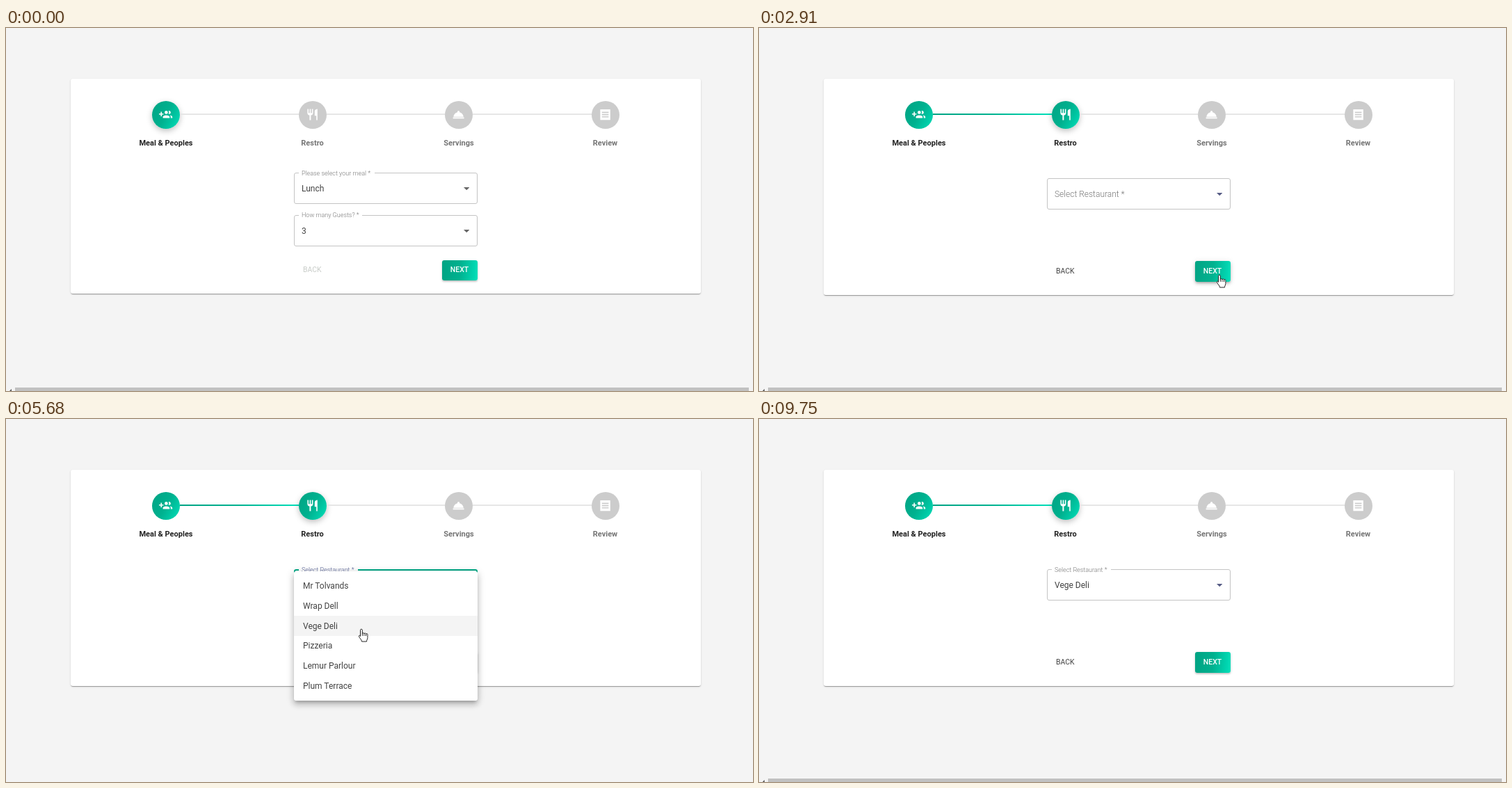
Recreate the animation shown at these times as an HTML page. Size 1074x522 px, loop 9820 ms.

```html
<!DOCTYPE html>
<html lang="en">
<head>
<meta charset="utf-8">
<title>Meal booking stepper</title>
<style>
  html, body { margin: 0; width: 100%; height: 100%; overflow: hidden; background: #f4f4f4; }
  body { position: relative; font: 12px Roboto, sans-serif; color: #424242; }
  div, span, svg, fieldset { position: absolute; box-sizing: border-box; }
  .text { line-height: 20px; margin-top: -10px; white-space: nowrap; }
  #card { left: 92.5px; top: 72.5px; width: 906.5px; background: #fff; border-radius: 3px;
    box-shadow: 0 2px 1px -1px #0003, 0 1px 1px #00000024, 0 1px 3px #0000001f; }
  .line { top: 122.6px; width: 170.5px; height: 2.4px; background: #e6e6e6; }
  .dot { top: 105px; width: 40px; height: 40px; border-radius: 50%; background: #ccc; }
  .dot svg { left: 10.4px; top: 10.4px; width: 19.2px; height: 19.2px; fill: #fff; fill-rule: evenodd; }
  .dot.done { background: linear-gradient(120deg, #00a383, #00b18f 50%, #00e0ba); }
  .line.done { background: linear-gradient(95deg, #00a383, #00b18f 50%, #00e0ba); }
  .dot.now { box-shadow: 0 3px 8px #00000040; }
  .step { top: 166px; width: 140px; text-align: center; font-size: 11px; font-weight: 600; color: #757575; }
  .step.done { color: #212121; }
  .field { left: 414px; width: 263.6px; height: 44.6px; }
  .field fieldset { left: 0; right: 0; top: -5px; bottom: 0; margin: 0; padding: 0 6px; min-width: 0;
    border: 1px solid #c4c4c4; border-radius: 3px; }
  .field legend { height: 10px; padding: 0 4px; font-size: 9px; line-height: 10px; overflow: hidden;
    white-space: nowrap; color: transparent; }
  .fill { inset: 1px; border-radius: 3px; }
  .label { left: 11px; top: 0; font-weight: 300; color: #777; transform: scale(.75); transform-origin: 0 50%; }
  .value { left: 11px; top: 22.6px; }
  .drop { left: 244px; top: 20.2px; width: 8.4px; height: 4.2px; fill: #666; }
  #back { left: 427px; font-size: 10.4px; }
  #next { left: 626.5px; width: 51px; height: 29.6px; border-radius: 3px; overflow: hidden;
    background: linear-gradient(95deg, #00a383, #00b18f 50%, #00e0ba); }
  #next .text { left: 0; right: 0; top: 14.8px; text-align: center; font-size: 10.5px; font-weight: 500; color: #fff; }
  .ripple { border-radius: 50%; }
  #menu { left: 414px; top: 218.6px; width: 263.6px; height: 185.6px; background: #fff; border-radius: 3px;
    transform-origin: 0 20.6px;
    box-shadow: 0 4px 4px -2px #0003, 0 6px 8px 1px #00000024, 0 2px 11px 2px #0000001f; }
  .row { left: 0; right: 0; height: 28.8px; overflow: hidden; }
  .row .text { left: 13px; top: 14.4px; }
  #scroll { left: 0; right: 0; top: 517px; height: 5px; }
  #scroll div { left: 13px; width: 1055px; height: 5px; background: #c1c1c1; }
  #scroll svg { left: 5px; top: 2px; width: 3px; height: 3px; fill: #555; }
  #spot { width: 20px; height: 20px; margin: -10px; border-radius: 50%; background: #ff08; }
  #cursor { width: 1px; height: 1px; overflow: visible; fill: #fff; stroke: #222; stroke-width: 1; stroke-linejoin: round; }
</style>
</head>
<body>
<div id="card"></div>
<div id="steps"></div>
<div id="fields"></div>
<div class="text" id="back">BACK</div>
<div id="next"><div class="ripple"></div><div class="text">NEXT</div></div>
<div id="scroll"><div></div><svg viewBox="0 0 3 3"><path d="M0 3L3 0V3z"/></svg></div>
<div id="menu"></div>
<div id="spot"></div>
<svg id="cursor">
  <path id="arrow" d="M0 0V14l3.2-3 2.2 5 2.2-1-2.1-4.8h4.5z"/>
  <g id="hand">
    <path d="M-1.5 1.6a1.4 1.4 0 0 1 2.8 0v5.2a1.3 1.3 0 0 1 2.6.3a1.3 1.3 0 0 1 2.6.5a1.2 1.2 0 0 1 2.4.7v4.2c0 2.2-1.4 3-1.4 5.5h-7c0-2-2.6-4.5-4-7.1c-.7-1.4.9-2.2 1.5-1.2l.5.8z"/>
    <path d="M1.3 6.8v3M3.9 7.3v2.6M6.5 7.8v2.2" fill="none"/>
  </g>
</svg>
<script>
const LOOP = 9820;
const $ = s => document.querySelector(s);

// Bursts of motion: start, end, number of pictures. The picture rests in between.
const BURSTS = [[600, 950, 6], [1210, 1910, 11], [2120, 3050, 15], [3130, 3400, 5], [3540, 3890, 6],
  [4090, 5060, 14], [5130, 5680, 8], [5950, 6500, 9], [7750, 8380, 10], [8650, 8800, 3], [9680, 9750, 2]];

// Pointer stops: time, x, y
const POINTER = [[600, 1063, 506], [950, 828, 426], [1140, 828, 426], [1910, 662, 355], [3060, 662, 355],
  [3400, 571, 239], [4020, 571, 239], [4450, 540, 368], [4690, 523, 301], [5060, 511, 304],
  [5400, 511, 321], [5680, 511, 302], [7680, 511, 302], [8380, 868, 427], [8570, 868, 427],
  [8800, 1058, 497], [9610, 1058, 497], [9680, 1065, 512]];

const AT = { press: 2120, page: 2400, open: 3600, pick: 5925, close: 6180, blur: 9680, leave: 9750 };
const PRESSES = [2120, 3540, 5950];
const MEALS = ['Mr Tolvands', 'Wrap Dell', 'Vege Deli', 'Pizzeria', 'Lemur Parlour', 'Plum Terrace'];
const PICKED = 2, ROW = 28.8, ROW_TOP = 225.2;
const STEPS = [
  ['Meal & Peoples', 'M8 10H5V7H3v3H0v2h3v3h2v-3h3zM18 11a3 3 0 1 0-.9-5.86a5 5 0 0 1 0 5.72zM13 11a3 3 0 1 0 0-6a3 3 0 0 0 0 6zM19.6 13.2c.9.7 1.4 1.6 1.4 2.8v2h3v-2c0-1.5-2.4-2.5-4.4-2.8zM13 13c-2 0-6 1-6 3v2h12v-2c0-2-4-3-6-3z'],
  ['Restro', 'M16 6v8h3v8h2V2c-2.8 0-5 2.2-5 4zM11 9H9V2H7v7H5V2H3v7a4 4 0 0 0 3.75 4V22h2.5v-9A4 4 0 0 0 13 9V2h-2z'],
  ['Servings', 'M2 17h20v2H2zM13.8 7.8a2 2 0 1 0-3.6 0C6.3 8.6 3.3 11.9 3 16h18c-.3-4.1-3.3-7.4-7.2-8.2z'],
  ['Review', 'M3 2.5h18v19H3zM6 7h12v2H6zM6 11h12v2H6zM6 15h12v2H6z']
];

$('#steps').innerHTML = STEPS.map(([name, icon], i) => {
  const x = 230 + i * 210.5;
  return (i ? `<div class="line" style="left:${x - 190.5}px"></div>` : '') +
    `<div class="dot" style="left:${x - 20}px"><svg viewBox="0 0 24 24"><path d="${icon}"/></svg></div>` +
    `<div class="text step" style="left:${x - 70}px">${name.replace('&', '&amp;')}</div>`;
}).join('');

const fieldHtml = (id, top, label, value) => `<div class="field" id="${id}" style="top:${top}px">
  <div class="fill"></div><fieldset><legend>${label}</legend></fieldset>
  <div class="text label">${label}</div><div class="text value">${value}</div>
  <svg class="drop" viewBox="0 0 10 5"><path d="M0 0h10L5 5z"/></svg></div>`;
$('#fields').innerHTML = fieldHtml('meal', 208.8, 'Please select your meal *', 'Lunch') +
  fieldHtml('guests', 269.4, 'How many Guests? *', '3') +
  fieldHtml('place', 216.8, 'Select Restaurant *', MEALS[PICKED]);

$('#menu').innerHTML = MEALS.map((name, i) =>
  `<div class="row" style="top:${6.6 + i * ROW}px"><div class="ripple"></div><div class="text">${name}</div></div>`).join('');

const dots = document.querySelectorAll('.dot'), names = document.querySelectorAll('.step');
const rows = document.querySelectorAll('.row');
const clamp = v => Math.min(1, Math.max(0, v));
const smooth = v => v * v * (3 - 2 * v);
const show = (el, on) => { el.style.display = on ? '' : 'none'; };

// CSS-style cubic-bezier(x1, 0, .2, 1)
function bezier(x1, x) {
  x = clamp(x);
  let lo = 0, hi = 1;
  for (let i = 0; i < 24; i++) {
    const u = (lo + hi) / 2, v = 1 - u;
    if (3 * v * v * u * x1 + 3 * v * u * u * .2 + u ** 3 < x) lo = u; else hi = u;
  }
  return lo * lo * (3 - 2 * lo);
}
const inOut = x => bezier(.4, x);
const out = x => bezier(0, x);

function snap(t) {
  const burst = BURSTS.filter(b => b[0] <= t).pop();
  if (!burst) return 0;
  const [start, end, count] = burst, step = (end - start) / (count - 1);
  return t >= end ? end : start + Math.floor((t - start) / step) * step;
}

function pointerAt(t) {
  const i = POINTER.findIndex(p => p[0] > t);
  if (i < 0) return POINTER[POINTER.length - 1].slice(1);
  if (i === 0) return POINTER[0].slice(1);
  const [a, ax, ay] = POINTER[i - 1], [b, bx, by] = POINTER[i];
  const k = smooth((t - a) / (b - a));
  return [ax + (bx - ax) * k, ay + (by - ay) * k];
}

function setRipple(el, x, y, r, color, alpha) {
  Object.assign(el.style, { left: x - r + 'px', top: y - r + 'px', width: 2 * r + 'px', height: 2 * r + 'px',
    background: color, opacity: alpha });
}

function render(t) {
  const second = t >= AT.page, focused = t >= AT.open && t < AT.blur;
  const opened = t >= AT.open && t < AT.close, picked = t >= AT.close;
  const [x, y] = pointerAt(t), visible = t >= 600 && t < AT.leave;
  const over = (l, top, r, b) => visible && x > l && x < r && y > top && y < b;
  const onNext = over(626, 333, 678, 365), onPlace = second && over(414, 217, 678, 262);
  const menuLive = t >= AT.open && t < AT.close + 230;

  // Stepper and card
  $('#card').style.height = second ? '311.5px' : '309.5px';
  dots.forEach((dot, i) => {
    dot.classList.toggle('done', i <= +second);
    dot.classList.toggle('now', i === +second);
    names[i].classList.toggle('done', i <= +second);
  });
  $('.line').classList.toggle('done', second);

  // Fields
  show($('#meal'), !second);
  show($('#guests'), !second);
  show($('#place'), second);
  const shrink = out((t - AT.open) / 200);
  const label = $('#place .label'), border = $('#place fieldset'), legend = $('#place legend');
  label.style.top = 22.4 - 22 * shrink + 'px';
  label.style.transform = `scale(${1 - .25 * shrink})`;
  label.style.color = focused ? '#4f5b92' : '#777';
  legend.style.maxWidth = t >= 3650 ? 'none' : '0';
  legend.style.padding = t >= 3650 ? '' : '0';
  border.style.border = focused ? '2px solid #00a885' : onPlace ? '1px solid #212121' : '';
  border.style.padding = focused ? '0 5px' : '';
  $('#place .fill').style.background = picked && focused ? '#f1f1f1' : '';
  show($('#place .value'), picked);
  const drop = $('#place .drop');
  drop.style.transform = opened ? 'rotate(180deg)' : '';
  drop.style.fill = opened ? '#14806b' : '#575c85';

  // Buttons
  const shift = second ? 1.6 : 0, next = $('#next');
  $('#back').style.top = 348.2 + shift + 'px';
  $('#back').style.color = second ? '#424242' : '#c8ccc8';
  next.style.top = 333.5 + shift + 'px';
  next.style.boxShadow = t >= AT.press && t < AT.page
    ? '0 4px 4px -2px #0003, 0 6px 8px 1px #00000024, 0 2px 11px 2px #0000001f'
    : onNext ? '0 2px 3px -1px #0003, 0 3px 4px #00000024, 0 1px 8px #0000001f'
    : '0 2px 1px -2px #0003, 0 2px 2px #00000024, 0 1px 4px #0000001f';
  setRipple($('#next .ripple'), 35.5, 21.5, 43 * inOut((t - AT.press) / 550), '#fff',
    .3 * (1 - inOut((t - AT.page) / 550)));

  // Menu
  const menu = $('#menu');
  const alpha = inOut((t - AT.open + 3) / 290) * (1 - inOut((t - AT.close) / 290));
  const grow = inOut((t - AT.open + 3) / 193) * (1 - inOut((t - AT.close - 97) / 193));
  show(menu, alpha > .001);
  menu.style.opacity = alpha;
  menu.style.transform = `scale(${.75 + .25 * grow}, ${.5625 + .4375 * grow})`;
  const hovered = t >= 4090 ? Math.floor((y - ROW_TOP) / ROW) : -1;
  rows.forEach((row, i) => {
    row.style.background = i === hovered ? (t >= AT.pick ? '#efefef' : '#f4f4f4') : '';
  });
  const spread = inOut((t - AT.pick) / 550);
  setRipple(rows[PICKED].firstChild, 97, 19.2, 168 * spread, '#212121', t >= AT.pick ? .1 + .17 * spread : 0);

  // Scrollbar and pointer
  show($('#scroll'), !opened);
  const spot = $('#spot'), cursor = $('#cursor');
  show(spot, PRESSES.some(p => t >= p && t < p + 210));
  show(cursor, visible);
  spot.style.left = cursor.style.left = x + 'px';
  spot.style.top = cursor.style.top = y + 'px';
  const hand = onNext || onPlace || (menuLive && over(414, 218, 678, 404));
  show($('#hand'), hand);
  show($('#arrow'), !hand);
}

const begin = performance.now();
function tick() {
  render(snap((performance.now() - begin) % LOOP));
  requestAnimationFrame(tick);
}
tick();
</script>
</body>
</html>
```
